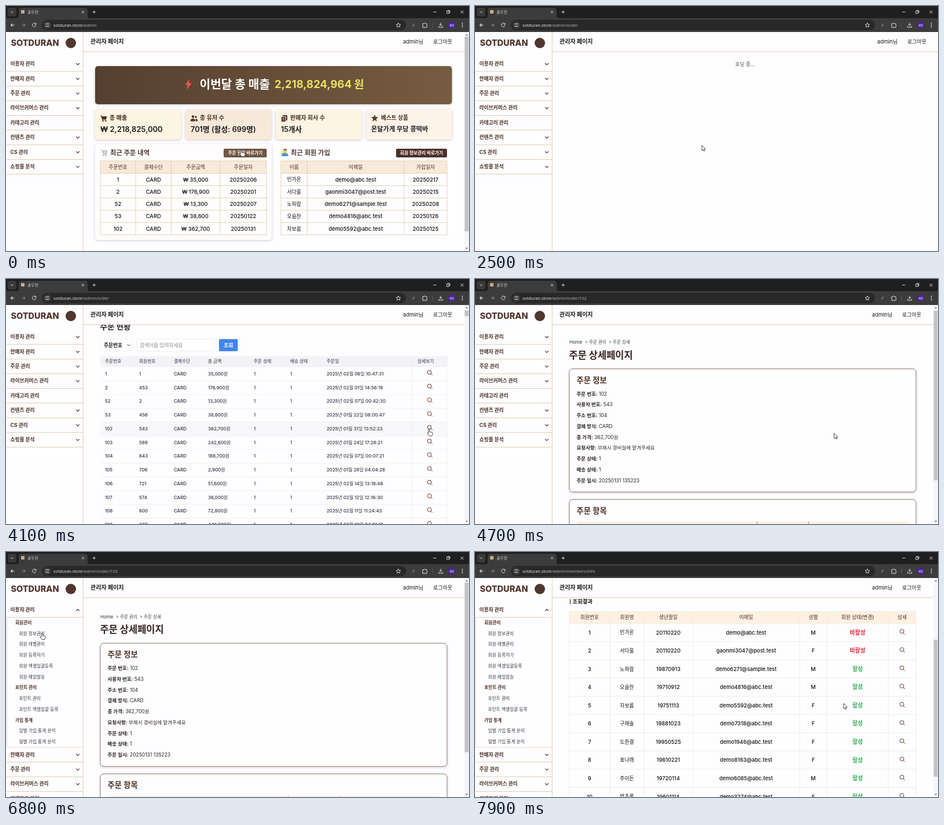
Write an HTML page that moves like this. It is 800 by 424 pixels and loops after 8000 ms.

```html
<!DOCTYPE html>
<html lang="ko">
<head>
<meta charset="utf-8">
<title>관리자 페이지</title>
<style>
html, body { margin: 0; width: 100%; height: 100%; overflow: hidden; background: #fefdff; }
svg { display: block; width: 800px; height: 424px; font-family: Inter, "Noto Sans CJK KR", "Noto Sans CJK JP", sans-serif; }
.card { filter: drop-shadow(0 1.5px 2px #0003); }
</style>
</head>
<body>
<svg id="stage" viewBox="0 0 800 424"></svg>
<script>
const BROWN = '#4b2e25', INK = '#1c1a1c', SLATE = '#2b3040', TAN = '#dcc8a6', CREAM = '#fdf1e1';

// Markup helpers; text is placed by its vertical centre.
const text = (x, y, s, size, weight = 400, fill = INK, anchor = 'start', extra = '') =>
  `<text x="${x}" y="${y + size * .36}" font-size="${size}" font-weight="${weight}" fill="${fill}" text-anchor="${anchor}" ${extra}>${s}</text>`;
const mid = (x, y, s, size, weight, fill) => text(x, y, s, size, weight, fill, 'middle');
const rect = (x, y, x2, y2, fill, r = 0, extra = '') =>
  `<rect x="${x}" y="${y}" width="${x2 - x}" height="${y2 - y}" rx="${r}" fill="${fill}" ${extra}/>`;
const dot = (x, y, r, fill) => `<circle cx="${x}" cy="${y}" r="${r}" fill="${fill}"/>`;
const line = (d, stroke, w = 1, extra = '') =>
  `<path d="${d}" fill="none" stroke="${stroke}" stroke-width="${w}" ${extra}/>`;
const shape = (d, fill, extra = '') => `<path d="${d}" fill="${fill}" ${extra}/>`;
const group = (id, body, extra = '') => `<g id="${id}" ${extra}>${body}</g>`;
const each = (list, fn) => list.map(fn).join('');
const lens = (x, y, c = '#63382d') => line(`M${x + 2.2} ${y + 2.2}l2.5 2.5M${x + 3} ${y - .4}a3.4 3.4 0 1 1 -6.8 0a3.4 3.4 0 1 1 6.8 0`, c, 1);
const chevron = (x, y, up) => line(`M${x - 2.8} ${y + (up ? 1.5 : -1.5)}l2.8 ${up ? -3 : 3}l2.8 ${up ? 3 : -3}`, BROWN, 1.1);

function browser() {
  const light = '#e3e3e3';
  return rect(0, 0, 800, 22, '#1f1f1f') + rect(0, 21, 800, 45, '#3c3c3c') + rect(3, 3, 18, 18, '#393939', 4)
    + line('M8.5 9.5l2.2 2.2l2.2 -2.2', light) + shape('M18 21q4 0 4 -4v-9q0 -5 5 -5h109q5 0 5 5v9q0 4 4 4z', '#3c3c3c')
    + group('favicon', rect(26, 7, 32, 13, '#c9ad84', 1))
    + group('spinner', line('M26 10a3 3 0 0 1 6 0', '#d5d5d5', 1.2))
    + text(37.5, 10.5, '솥두란', 6.6, 400, '#dedede')
    + line('M131 8.5l4 4m0 -4l-4 4M149.5 10.5h5.5m-2.75 -2.75v5.5', light, .9)
    + line('M738 10.5h5.5M761.5 9h4v4h-4zM763 9v-1.3h4v4h-1.5M785.5 8l5 5m0 -5l-5 5', light, .9)
    + line('M14.5 33h-6m2.7 -2.7l-2.7 2.7l2.7 2.7', light, 1.1) + line('M27 33h6m-2.7 -2.7l2.7 2.7l-2.7 2.7', '#818181', 1.1)
    + group('reload', line('M51.5 31a3.2 3.2 0 1 0 .5 2.5M52 29.5v2.3h-2.4', light))
    + group('stop', line('M46.3 30.3l5.4 5.4m0 -5.4l-5.4 5.4', light))
    + rect(62, 24, 691, 42, '#282828', 9) + dot(71.5, 33, 6.5, '#3c3c3c')
    + line('M68 31h3m2.5 0h1.5M68 35h1.5m2.5 0h3', light, .9) + dot(72.3, 31, 1, light) + dot(70.6, 35, 1, light)
    + text(82, 33, '<tspan fill="#f1f1f1">sotduran.store</tspan><tspan id="path"></tspan>', 7.3, 400, '#b5b5b5', 'start', 'font-family="Open Sans, sans-serif"')
    + shape('M678 29.2l1.1 2.6l2.8 .2l-2.1 1.8l.7 2.8l-2.5 -1.5l-2.5 1.5l.7 -2.8l-2.1 -1.8l2.8 -.2z', 'none', `stroke="${light}" stroke-width=".9"`)
    + shape('M701.5 36q0 -6 5 -6q0 6 -5 6z', '#5c625c') + line('M720 30.5h2q1.5 -2.5 3 0h2v2.2q2 1.2 0 2.4v1.9h-7z', light)
    + line('M737 29v8', '#666', .8) + line('M751 29v5m-2.3 -2.3l2.3 2.3l2.3 -2.3M747.5 34.5v2.3h7v-2.3', light)
    + dot(770, 33, 6, '#4a1f9c') + mid(770, 33, '새봄', 4.6, 400, '#fff')
    + each([30, 33, 36], y => dot(788.5, y, .9, light));
}

function sidebar() {
  const names = ['이용자 관리', '판매자 관리', '주문 관리', '라이브커머스 관리', '카테고리 관리', '컨텐츠 관리', 'CS 관리', '쇼핑몰 분석'];
  const item = (s, i) => {
    const y = 100 + i * 25.4;
    return text(7.5, y, s, 8.7, 700, BROWN) + line(`M1 ${y + 13.2}H133`, TAN, .9) + (i && i !== 4 ? chevron(124, y + .5) : '');
  };
  const sub = ['회원관리', '회원 정보관리', '회원 레벨관리', '회원 등록하기', '회원 엑셀일괄등록', '회원 메일발송',
    '포인트 관리', '포인트 관리', '포인트 엑셀일괄 등록', '가입 통계', '일별 가입 통계 분석', '월별 가입 통계 분석'];
  return rect(0, 45, 133, 424, '#fefdff') + item(names[0], 0) + group('down', chevron(124, 100.5)) + group('up', chevron(124, 100.5, true))
    + group('submenu', line('M1.3 113V338H133', '#ead9bf', .9) + each(sub, (s, i) => {
      const head = i % 3 === 0 && i !== 3;
      return text(head ? 16 : 22.5, 122 + i * 18.75, s, 7.7, head ? 700 : 400, head ? BROWN : '#3e3a40');
    }))
    + group('items', each(names.slice(1), (s, i) => item(s, i + 1)))
    + rect(0, 45, 133, 86, '#fefdff') + text(8.5, 63.5, 'SOTDURAN', 14.5, 800, '#50362b') + dot(112, 64, 9, '#50362b')
    + line('M133.3 45V424', TAN, .9);
}

const header = () => rect(134, 45, 800, 79, '#fefdff') + line('M133 79H800', TAN, .9) + text(146, 61.5, '관리자 페이지', 10, 700)
  + group('account', text(686, 61.5, 'admin님', 9.3) + text(738, 61.5, '로그아웃', 9, 500));

// Bordered table with centred cells.
function grid(cols, top, headH, rowH, head, rows, border, headFill, sizes) {
  const bottom = top + headH + rowH * rows.length, left = cols[0], right = cols.at(-1);
  const cx = i => (cols[i] + cols[i + 1]) / 2;
  return rect(left, top, right, top + headH, headFill)
    + each(rows, (_, i) => line(`M${left} ${top + headH + i * rowH}H${right}`, border, .8))
    + line(`M${left} ${top}H${right}V${bottom}H${left}z`, border, .8)
    + each(cols.slice(1, -1), x => line(`M${x} ${top}V${bottom}`, border, .8))
    + each(head, (s, i) => mid(cx(i), top + headH / 2, s, sizes[0], 500, BROWN))
    + each(rows, (r, j) => each(r, (s, i) => mid(cx(i), top + headH + rowH * (j + .5), s, /[가-힣]/.test(s) ? 8.8 : sizes[1], 500, '#111')));
}

const people = [['민가온', 'demo@abc.test'], ['서다울', 'gaonmi3047@post.test'], ['노하람', 'demo6271@sample.test'], ['오슬찬', 'demo4816@abc.test'],
  ['차보름', 'demo5592@abc.test'], ['구해솔', 'demo7318@abc.test'], ['도한결', 'demo1946@abc.test'], ['표나래', 'demo8163@abc.test'],
  ['추이든', 'demo6085@abc.test'], ['방초롱', 'demo3274@abc.test']];

function dashboard() {
  const icons = [
    line('M163 190h2l1.5 7h6.5', BROWN, 1.2) + shape('M165.5 191h9l-1.5 5h-6.5z', BROWN) + dot(167.5, 199, 1.2, BROWN) + dot(172.5, 199, 1.2, BROWN),
    dot(323, 191.5, 2.2, BROWN) + dot(328, 192, 1.7, BROWN) + shape('M319 199.5v-1.5q0 -3 4 -3t4 3v1.5zM328 199.5v-3l-1 -1.5q4 0 4 3v1.5z', BROWN),
    shape('M478 189h8v9h-2v-7h-6zM476 192h7v8h-7z', BROWN) + line('M477.5 194.5h4M477.5 197h4', '#fdf3e0', .8),
    shape('M637 188l1.8 4.1l4.4 .3l-3.4 2.9l1.1 4.4l-3.9 -2.4l-3.9 2.4l1.1 -4.4l-3.4 -2.9l4.4 -.3z', '#63382d')];
  const cards = [[154, '총 매출', '₩ 2,218,825,000', 13, '#fdf4e1'], [310, '총 유저 수', '701명 (활성: 699명)', 12.8, '#f8ead9'],
    [466, '판매자 회사 수', '15개사', 12.6, '#fdf4e1'], [622, '베스트 상품', '온달가게 무당 콩떡바', 11.2, '#fdf3e8']];
  const orders = [[1, '35,000', '0206'], [2, '176,900', '0201'], [52, '13,300', '0207'], [53, '38,600', '0122'], [102, '362,700', '0131']];
  const joined = ['0217', '0215', '0208', '0126', '0125'];
  return `<linearGradient id="cocoa"><stop stop-color="#553f30"/><stop offset="1" stop-color="#765c40"/></linearGradient>`
    + rect(154, 104, 770.5, 170, 'url(#cocoa)', 5, 'class="card"')
    + shape('M317.5 126l-8 10.5h4.5l-2 8.5l9 -11.5h-5z', '#ee5a48')
    + text(334.5, 135.5, '이번달 총 매출', 20.3, 700, '#fff') + text(464, 135.5, '2,218,824,964 원', 18.6, 700, '#e9e45e')
    + each(cards, ([x, a, b, size, fill], i) => rect(x, 179, x + 148.5, 231, fill, 4, 'class="card"') + icons[i]
      + text(x + (i === 3 ? 26 : 25), 193.5, a, i === 3 ? 9.7 : 10, 600, BROWN) + text(x + 9, 213, b, size, 600))
    + rect(154, 239, 459, 405, '#fffdfd', 4, 'class="card"')
    + line('M164 249l2.5 1l2 6h5.5M166.5 250.5h8l-1.5 5h-5M167.5 252.8h6.5', '#8d949b', .9) + dot(168.5, 258.5, 1.1, '#c46d5f') + dot(173, 258.5, 1.1, '#c46d5f')
    + text(180, 254, '최근 주문 내역', 11.3, 600, '#4a3a33') + rect(376, 247, 450.5, 262, '#705540', 2)
    + mid(413.5, 254.3, '주문 현황 바로가기', 7.6, 700, '#fff')
    + shape('M476.5 260v-3q1 -3 5 -3t6 3v3z', '#4699c8') + dot(482, 251, 3, '#f1c65b') + line('M477 256l-.5 -7', '#f1c65b', 1.7) + shape('M478.8 250q1 -4 5 -2.5q1.8 .7 1.4 3l-3 -1.5z', '#755137')
    + text(492, 254, '최근 회원 가입', 11.3, 600, '#4a3a33') + rect(674, 247, 762, 262, '#4d3028', 2)
    + mid(718, 254.3, '회원 정보관리 바로가기', 7.7, 700, '#fff')
    + grid([163, 224, 285.5, 370, 450], 268, 21.5, 21.3, ['주문번호', '결제수단', '주문금액', '주문일자'],
      orders.map(([n, won, day]) => [n, 'CARD', '₩ ' + won, '2025' + day]), TAN, '#f8ead9', [8.8, 9.4])
    + grid([475, 520.5, 688, 762], 268, 21.5, 21.3, ['이름', '이메일', '가입일자'],
      joined.map((day, i) => [...people[i], '2025' + day]), TAN, '#f8ead9', [8.8, 9.4]);
}

const crumbs = (a, b) => text(163, 112, 'Home', 8, 400, '#333') + text(190, 112, '&gt; ' + a, 7.5, 400, '#444') + text(231 + (a.length - 5) * 7, 112, '&gt; ' + b, 7.5, 400, '#444');
const searchBar = y => rect(163, y, 218, y + 21, '#fff', 2, 'stroke="#ececf0" stroke-width=".8"') + text(169, y + 10.5, '주문번호', 8.7, 600)
  + line(`M209.8 ${y + 9.5}l2.3 2.3l2.3 -2.3`, '#222') + rect(226, y, 360, y + 21, '#fff', 2, 'stroke="#e6e6ea" stroke-width=".8"')
  + text(231, y + 10.5, '검색어를 입력하세요', 8.7, 400, '#8b8b90') + rect(368, y, 400.5, y + 21, '#4285f0', 2) + mid(384.3, y + 10.5, '조회', 8.8, 700, '#fff');

const rowTop = 205.5, rowH = 23.75;
function orderList() {
  const xs = [171, 230, 290, 349, 428, 491, 554];
  const rows = ['1 1 35,000 02 06 10:47:31', '2 453 176,900 02 01 14:56:19', '52 2 13,300 02 07 00:42:30', '53 456 38,600 01 22 08:00:47',
    '102 543 362,700 01 31 13:52:23', '103 589 242,600 01 24 17:28:21', '104 643 188,700 02 07 00:07:21', '105 706 2,900 01 28 04:04:28',
    '106 721 51,600 02 14 13:18:46', '107 574 36,000 02 12 12:16:30', '108 600 72,800 02 11 11:24:43', '109 607 448,500 02 10 04:01:17'];
  return crumbs('주문 관리', '주문 현황') + text(162.5, 135, '주문 현황', 13.5, 700) + searchBar(157)
    + rect(163, 186.5, 762, rowTop, '#f3f2f7') + rect(163, 0, 762, rowH, '#f8f8fb', 0, 'id="hover"')
    + each(['주문번호', '회원번호', '결제수단', '총 금액', '주문 상태', '배송 상태', '주문일'], (s, i) => text(xs[i], 195.5, s, 7.7, 500, SLATE)) + text(711, 195.5, '상세보기', 7.7, 500, SLATE)
    + line('M702 186.5V520M762 186.5V520', '#ebeaf0', .8)
    + each(rows, (r, i) => {
      const [no, user, won, m, d, time] = r.split(' '), y = 217 + i * rowH;
      return each([no, user, 'CARD', won + '원', 1, 1, `2025년 ${m}월 ${d}일 ${time}`], (s, j) => text(xs[j], y, s, 7.9, 500, SLATE))
        + lens(732, y - 2) + line(`M163 ${rowTop + (i + 1) * rowH}H762`, '#ececf1', .8);
    });
}

function orderDetail() {
  const info = [['주문 번호', 102], ['사용자 번호', 543], ['주소 번호', 104], ['결제 방식', 'CARD'], ['총 가격', '362,700원'], ['요청사항', '부재시 경비실에 맡겨주세요'],
    ['주문 상태', 1], ['배송 상태', 1], ['주문 일시', '20250131 135223']];
  const box = (y, y2) => rect(163, y, 762, y2, '#fefdff', 6, 'stroke="#88745f" stroke-width=".9" class="card"');
  return crumbs('주문 관리', '주문 상세') + text(162.5, 134.5, '주문 상세페이지', 16.5, 700, '#35241f') + box(158, 371) + text(175.5, 177.5, '주문 정보', 13.3, 600, BROWN)
    + each(info, ([k, v], i) => text(175.5, 201 + i * 18.75, `<tspan font-weight="700">${k}:</tspan> ${v}`, 8.5, 400, '#2c2220'))
    + box(384, 486) + text(175.5, 403.5, '주문 항목', 13.3, 600, BROWN) + rect(176, 422, 749, 447, CREAM, 3)
    + line('M176 447.3H749M487.5 422V472M576.5 422V472M176 472H749', '#9a8770', .8)
    + each([['상품명', '두툼제육버섯치즈주먹밥', 331.5], ['수량', '9', 531.5], ['가격', '362,700원', 662.5]], ([a, b, x]) => mid(x, 434, a, 8.7, 700, BROWN) + mid(x, 459.3, b, 8.7, 600));
}

const memberScroll = 158;
function members() {
  const births = ['20110220', '20110220', '19870913', '19710912', '19751113', '19881023', '19950525', '19610221', '19720114', '19601114'];
  const top = 103 + memberScroll;
  return crumbs('이용자 관리', '회원 정보관리') + text(162.5, 134.5, '회원 정보관리', 16.5, 700, '#35241f') + searchBar(170)
    + line(`M164.5 ${81.5 + memberScroll}v9`, INK, 1.1) + text(168.5, 86 + memberScroll, '조회결과', 9.4, 700)
    + grid([163, 233, 292, 376, 561, 608, 714, 762], top, 20.5, 31.55, ['회원번호', '회원명', '생년월일', '이메일', '성별', '회원 상태(변경)', '상세'],
      people.map(([name, mail], i) => [i + 1, name, births[i], mail, 'MFMMFFFFMF'[i]]), '#f1e8dd', CREAM, [8.7, 9.2])
    + each(people, (_, i) => {
      const y = top + 36.2 + i * 31.55;
      return mid(661, y, i < 2 ? '비활성' : '활성', 9.8, 700, i < 2 ? '#dc2638' : '#2bb04f') + lens(738, y - 1.5);
    });
}

const arrow = 'M0 0V9.2L2.1 7.4L3.5 10.3L4.9 9.6L3.5 6.8H6.3Z';
const hand = 'M-1 0q1 -1.4 2 0v4l1 -.5l1 .6l1 -.2l1 .7q1 0 1 1v2l-1.3 3h-4.4l-3.4 -4.4q.3 -1.2 1.5 -.4l.6 .6z';

stage.innerHTML = rect(0, 0, 800, 424, '#fefdff')
  + group('dash', dashboard()) + group('orders', orderList()) + group('detail', orderDetail()) + group('members', members())
  + group('loading', mid(466.5, 100.5, '로딩 중...', 8.7, 400, '#555'))
  + group('frame', sidebar() + header())
  + group('scrollbar', rect(792, 45, 800, 424, '#f6f5f7') + shape('M793.8 51l2.2 -2.6l2.2 2.6zM793.8 418.5l2.2 2.6l2.2 -2.6z', '#777') + rect(792.5, 53, 799.3, 63, '#c3c2c5', 0, 'id="thumb"'))
  + browser() + group('pointer', shape(arrow, '#fff', 'id="arrowShape"') + shape(hand, '#fff', 'id="handShape"'), 'stroke="#222" stroke-width=".8"');

const $ = id => document.getElementById(id);
const show = (id, on) => $(id).style.display = on ? '' : 'none';

// [start, view, path]
const scenes = [[0, 'dash', ''], [800, 'blank', '/order'], [1500, 'loading', '/order'], [2600, 'orders', '/order'], [4300, 'loading', '/order/102'],
  [4500, 'detail', '/order/102'], [7000, 'loading', '/members/info'], [7200, 'members', '/members/info']];
const thumbs = { dash: 337, orders: 10, detail: 293.5, members: 237 };
const scrolls = { orders: [[2800, 0], [3500, 53]], detail: [[4600, 0], [5300, 44.7], [5600, 44.7], [6100, 0]], members: [[7300, 0], [7800, memberScroll]] };
const moves = [[0, 407, 250], [600, 407, 250], [1200, 387, 199], [1800, 387, 199], [2500, 392, 241], [2900, 392, 241], [3700, 731, 250], [4100, 731, 261], [4300, 731, 261],
  [5300, 417, 278], [5600, 417, 278], [6100, 62, 99], [6300, 62, 99], [6800, 62, 141], [7000, 62, 141], [7700, 637, 262], [8000, 637, 262]];

function track(keys, t, n = 1) {
  const i = keys.findIndex(k => k[0] > t);
  if (i < 0) return keys.at(-1)[n];
  if (!i) return keys[0][n];
  const a = keys[i - 1], b = keys[i], p = (t - a[0]) / (b[0] - a[0]);
  return a[n] + (b[n] - a[n]) * p * p * (3 - 2 * p);
}

function draw(now) {
  const t = Math.floor(now % 8000 / 100) * 100;
  const [, view, path] = scenes.findLast(s => s[0] <= t);
  const blank = view === 'blank', open = t >= 6200, bar = view in thumbs;
  const scroll = scrolls[view] ? track(scrolls[view], t) : 0;
  const x = track(moves, t, 1), y = track(moves, t, 2);

  for (const id of ['dash', 'orders', 'detail', 'members', 'loading']) show(id, id === view);
  if (scrolls[view]) $(view).setAttribute('transform', `translate(0 ${-scroll})`);
  $('path').textContent = '/admin' + path;
  show('frame', !blank);
  show('favicon', !blank);
  show('reload', !blank);
  show('spinner', blank);
  show('stop', blank);
  $('spinner').setAttribute('transform', `rotate(${t * .4} 29 10)`);

  show('submenu', open);
  show('up', open);
  show('down', !open);
  $('items').setAttribute('transform', `translate(0 ${open ? 225 : 0})`);
  $('account').setAttribute('transform', `translate(${bar ? 0 : 9} 0)`);

  show('scrollbar', bar);
  if (bar) {
    $('thumb').setAttribute('y', 53 + scroll * thumbs[view] / 379);
    $('thumb').setAttribute('height', thumbs[view]);
  }

  const row = Math.floor((y + scroll - rowTop) / rowH);
  show('hover', row >= 0 && x > 163 && x < 762);
  $('hover').setAttribute('y', rowTop + row * rowH);

  const pointing = t < 800 || t >= 3600 && t < 4300 || t >= 6000 && t < 7000;
  show('handShape', pointing);
  show('arrowShape', !pointing);
  $('pointer').setAttribute('transform', `translate(${x} ${y})`);
  requestAnimationFrame(draw);
}
requestAnimationFrame(draw);
</script>
</body>
</html>
```
